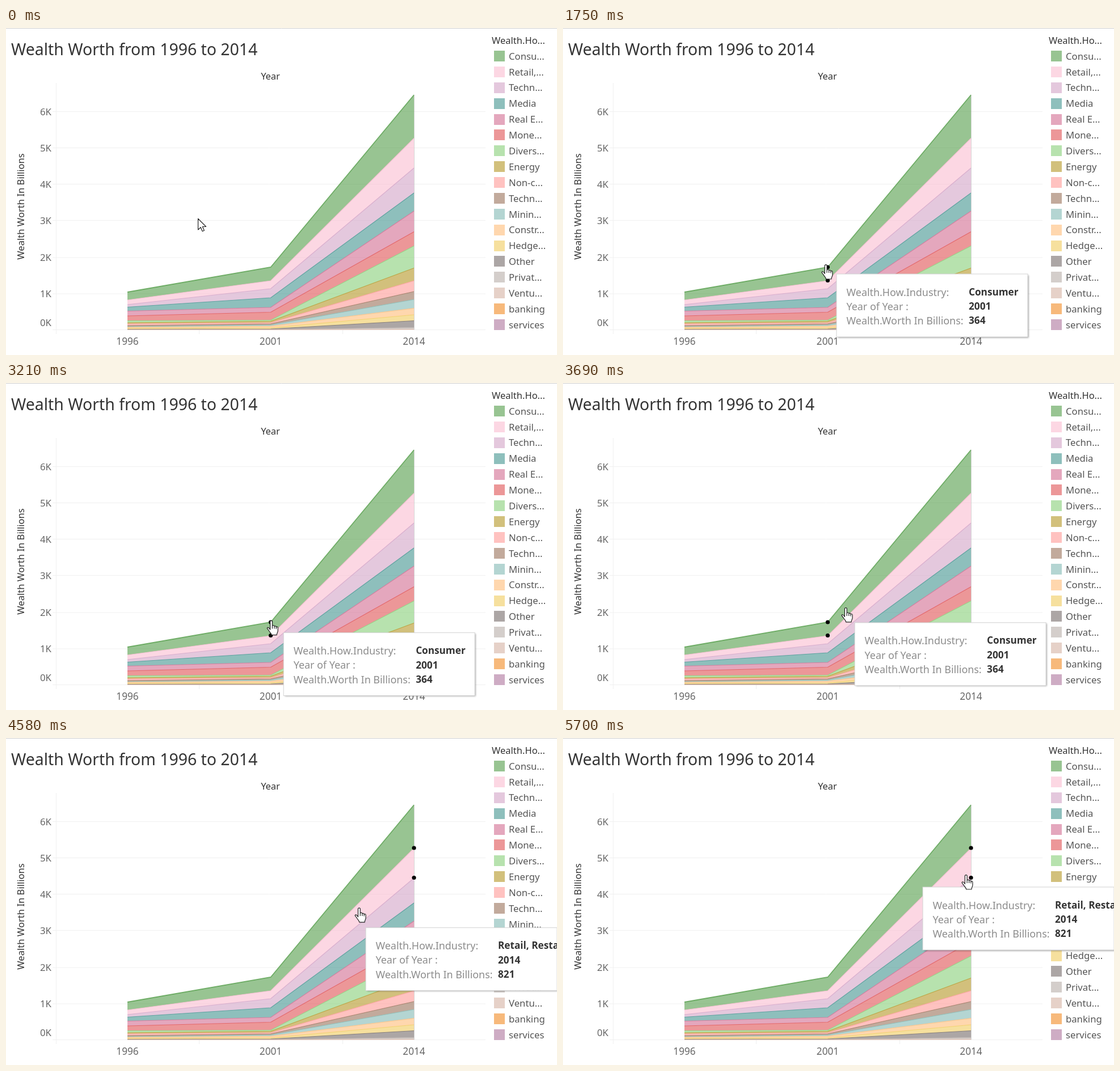
An HTML page with a canvas for the animation above (6560 ms loop, 971 px wide and 577 px high).

```html
<!DOCTYPE html>
<html lang="en">
<head>
<meta charset="utf-8">
<title>Wealth Worth</title>
<style>
html, body { margin: 0; width: 100%; height: 100%; overflow: hidden; background: #fff; }
canvas { display: block; }
</style>
</head>
<body>
<canvas id="stage" width="971" height="577"></canvas>
<script>
const ctx = document.getElementById('stage').getContext('2d');
const LOOP = 6560;
const BASE = 532.5;
const YEARS = [[214, 1996], [466.5, 2001], [719, 2014]];

// Each series: legend label, colour, top edge at the three years
const SERIES = [
  ['Consu...', '#59a14f', 466, 422, 118],
  ['Retail,...', '#fabfd2', 480, 446, 194.5],
  ['Techn...', '#d4a6c8', 488, 460, 247],
  ['Media', '#499894', 492.5, 476, 291],
  ['Real E...', '#d37295', 499.5, 493, 323],
  ['Mone...', '#e15759', 508, 501.5, 359.5],
  ['Divers...', '#8cd17d', 516.5, 515.5, 384.5],
  ['Energy', '#b6992d', 520, 517.5, 423.5],
  ['Non-c...', '#ff9d9a', 522, 520, 446],
  ['Techn...', '#9d7660', 525, 522, 465],
  ['Minin...', '#86bcb6', 527, 524, 479],
  ['Constr...', '#ffbe7d', 528, 526, 494.5],
  ['Hedge...', '#f1ce63', 530, 529, 506],
  ['Other', '#79706e', 531.5, 531, 516.5],
  ['Privat...', '#bab0ac', 532, 532, 528.5],
  ['Ventu...', '#d7b5a6', 532.3, 532.3, 531.5],
  ['banking', '#f28e2b', BASE, BASE, BASE],
  ['services', '#b07aa1', BASE, BASE, BASE],
];

// Motion paths: [time, x, y]
const ARROW_PATH = [[100, 338, 336], [740, 385, 347.5], [1410, 453, 402], [1540, 460, 412]];
const HAND_PATH = [[1540, 453, 411], [1750, 455, 417], [2090, 456, 421], [3160, 456, 421],
  [3690, 490, 396], [3820, 506, 383], [4160, 567, 337], [4510, 606, 304],
  [5060, 669, 266], [5230, 682, 256], [5700, 702, 241]];
const TIP_PATH = [[1610, 480, 430], [1750, 482, 434], [2090, 486.5, 442.5], [3160, 486.5, 442.5],
  [3690, 514, 423], [3820, 526, 411], [4160, 581, 372], [4510, 634, 340],
  [5060, 634, 299], [5230, 634, 286], [5700, 634, 263]];
const HAND_AT = 1540, TIP_AT = 1610, RETAIL_AT = 4370;

const ARROW = new Path2D('M.5.5V20l4.6-4.3 3 7 3.2-1.4-3-6.8h6.2Z');
const HAND = new Path2D('M6.3 16.5V2.6a1.9 1.9 0 0 1 3.8 0V11c0-2.6 3.5-2.4 3.5 0v.8c0-2.3 3.3-2 3.3.4v.8' +
  'c.2-2 3-1.8 3 .4v5c0 3-2 4.2-2 7.6H8.6c0-2.6-2.4-4-4.4-7.4C3 16.6 1 15.2 1 14c.4-2 3-1.4 5.3 2.5Z' +
  'M10.1 11v4M13.6 11.8v3.2M16.9 13v2.5');

function along(path, t) {
  const i = path.findIndex(key => key[0] > t);
  if (i === 0) return path[0].slice(1);
  if (i < 0) return path[path.length - 1].slice(1);
  const [t0, x0, y0] = path[i - 1], [t1, x1, y1] = path[i];
  const k = (t - t0) / (t1 - t0);
  return [x0 + (x1 - x0) * k, y0 + (y1 - y0) * k];
}

function text(str, x, y, size, color, weight = 400, align = 'left') {
  ctx.font = `${weight} ${size}px "Noto Sans", sans-serif`;
  ctx.fillStyle = color;
  ctx.textAlign = align;
  ctx.fillText(str, x, y);
}

function line(x0, y0, x1, y1, color) {
  ctx.strokeStyle = color;
  ctx.lineWidth = 1;
  ctx.beginPath();
  ctx.moveTo(x0, y0);
  ctx.lineTo(x1, y1);
  ctx.stroke();
}

function drawAxes() {
  line(0, 0.5, 971, 0.5, '#cfcfcf');
  text('Wealth Worth from 1996 to 2014', 9, 48, 28.4, '#333', 300);
  text('Year', 466, 90.5, 16.4, '#333', 500, 'center');
  [520, 469, 405, 339.5, 275.5, 211.5, 147.5].forEach((y, k) => {
    line(82, k ? y : BASE, 845, k ? y : BASE, '#f0f0f0');
    text(k + 'K', 80, y + 6, 16.8, '#666', 400, 'right');
  });
  line(88.5, 97, 88.5, 540, '#f0f0f0');
  for (const x of [340.5, 593.5]) line(x, BASE, x, 540, '#eee');
  for (const [x, year] of YEARS) text(year, x, 558.5, 17.2, '#666', 400, 'center');
  ctx.save();
  ctx.translate(32, 315);
  ctx.rotate(-Math.PI / 2);
  text('Wealth Worth In Billions', 0, 0, 16.6, '#333', 500, 'center');
  ctx.restore();
}

function drawAreas() {
  SERIES.slice(0, 16).forEach(([, color, ...tops], i) => {
    const bottoms = SERIES[i + 1].slice(2);
    const edge = new Path2D(), area = new Path2D();
    tops.forEach((y, k) => { edge.lineTo(YEARS[k][0], y); area.lineTo(YEARS[k][0], y); });
    for (const k of [2, 1, 0]) area.lineTo(YEARS[k][0], bottoms[k]);
    ctx.fillStyle = ctx.strokeStyle = color;
    ctx.globalAlpha = 0.62;
    ctx.fill(area);
    ctx.globalAlpha = 0.8;
    ctx.lineWidth = i ? 1.2 : 1.8;
    ctx.stroke(edge);
    ctx.globalAlpha = 1;
  });
  line(719.5, 118, 719.5, BASE, 'rgba(190,190,190,.6)');
}

function drawLegend() {
  text('Wealth.Ho...', 856, 28, 16.5, '#333', 500);
  SERIES.forEach(([label, color], i) => {
    const y = 49.5 + i * 27.88;
    ctx.globalAlpha = 0.62;
    ctx.fillStyle = color;
    ctx.fillRect(860, Math.round(y - 9.5), 19, 19);
    ctx.globalAlpha = 1;
    text(label, 886, y + 6.2, 16.7, '#555');
  });
}

function drawDots(x, ...ys) {
  ctx.fillStyle = '#000';
  for (const y of ys) {
    ctx.beginPath();
    ctx.arc(x, y, 3.6, 0, 7);
    ctx.fill();
  }
}

function drawTooltip(x, y, values) {
  ctx.save();
  ctx.shadowColor = 'rgba(0,0,0,.4)';
  ctx.shadowBlur = 3;
  ctx.shadowOffsetX = ctx.shadowOffsetY = 1.5;
  ctx.fillStyle = '#fff';
  ctx.fillRect(x, y, 337, 111);
  ctx.restore();
  ctx.strokeStyle = '#d4d4d4';
  ctx.lineWidth = 1;
  ctx.strokeRect(x, y, 337, 111);
  ['Wealth.How.Industry:', 'Year of Year :', 'Wealth.Worth In Billions:'].forEach((label, i) => {
    text(label, x + 17.5, y + 38.5 + i * 25.2, 17.9, '#8c8c8c');
    text(values[i], x + 233, y + 37.5 + i * 25.4, 17.2, '#333', 600);
  });
}

function drawCursor(shape, [x, y]) {
  ctx.save();
  ctx.translate(x, y);
  ctx.fillStyle = '#fff';
  ctx.strokeStyle = '#222';
  ctx.lineWidth = 1.2;
  ctx.lineJoin = 'round';
  ctx.fill(shape);
  ctx.stroke(shape);
  ctx.restore();
}

function draw(now) {
  const t = now % LOOP;
  const retail = t >= RETAIL_AT;
  ctx.fillStyle = '#fff';
  ctx.fillRect(0, 0, 971, 577);
  drawAxes();
  drawAreas();
  drawLegend();
  if (retail) drawDots(719, 194, 246.5);
  else if (t >= HAND_AT) drawDots(466.5, 422, 445.5);
  if (t >= TIP_AT) {
    const values = retail ? ['Retail, Restaurant', '2014', '821'] : ['Consumer', '2001', '364'];
    drawTooltip(...along(TIP_PATH, t), values);
  }
  if (t < HAND_AT) drawCursor(ARROW, along(ARROW_PATH, t));
  else drawCursor(HAND, along(HAND_PATH, t));
  requestAnimationFrame(draw);
}
requestAnimationFrame(draw);
</script>
</body>
</html>
```
